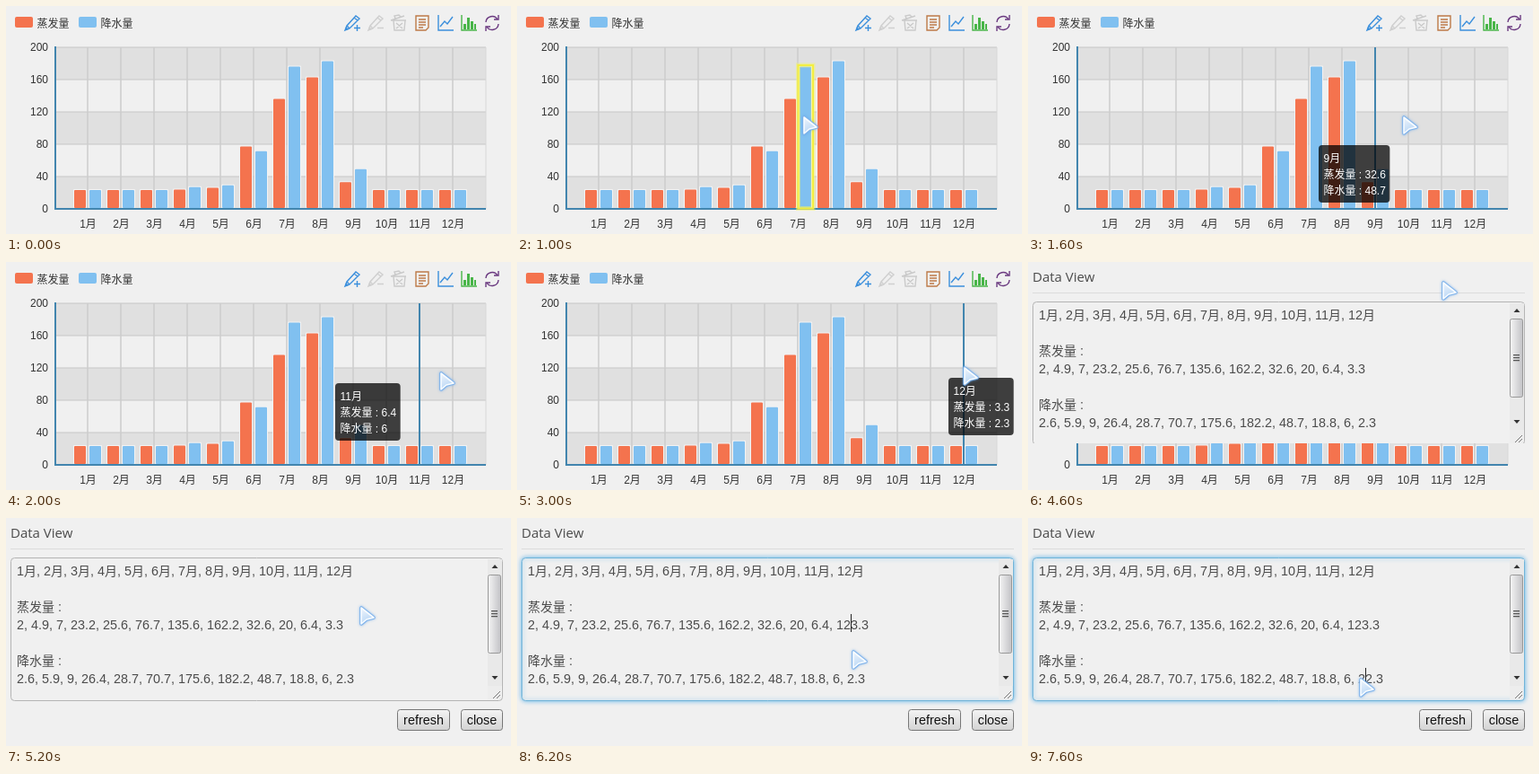
Write an HTML page with a canvas that moves like this. It is 563 by 254 pixels and loops after 8000 ms.

```html
<!DOCTYPE html>
<html lang="zh">
<head>
<meta charset="utf-8">
<title>Data View</title>
<style>
html, body { margin: 0; width: 100%; height: 100%; overflow: hidden; background: #f0f0f0; }
canvas { display: block; }
</style>
</head>
<body>
<canvas id="stage" width="563" height="254"></canvas>
<script>
const ctx = document.getElementById('stage').getContext('2d');
const STEP = 200, STEPS = 40;
const BG = '#f0f0f0', RED = '#f4734e', BLUE = '#80c0f0', AXIS = '#4285ae';
const SANS = '"Liberation Sans", "Noto Sans CJK SC", "Noto Sans CJK", sans-serif';
const NAMES = ['蒸发量', '降水量'];
const DATA = [
  [2, 4.9, 7, 23.2, 25.6, 76.7, 135.6, 162.2, 32.6, 20, 6.4, 3.3],
  [2.6, 5.9, 9, 26.4, 28.7, 70.7, 175.6, 182.2, 48.7, 18.8, 6, 2.3]
];
const MONTHS = DATA[0].map((_, i) => `${i + 1}月`);
const monthX = i => 91 + 37 * i;

// [step, x, y]
const POINTER = [[1, 338, 198], [4, 338, 198], [5, 319, 123], [10, 484, 123], [12, 497, 119],
  [15, 498, 117], [16, 496, 104], [20, 463, 23], [23, 462, 22], [27, 372, 124],
  [29, 372, 124], [31, 374, 148], [34, 370, 179], [39, 370, 179]];
const TIP = [[6, 281, 174], [10, 367, 135], [13, 481, 129], [18, 481, 129]];

function along(keys, s) {
  const i = keys.findIndex(k => k[0] >= s);
  if (i < 1) return keys[0].slice(1);
  const [a, x0, y0] = keys[i - 1], [b, x1, y1] = keys[i], f = (s - a) / (b - a);
  return [Math.round(x0 + (x1 - x0) * f), Math.round(y0 + (y1 - y0) * f)];
}

function rect(x, y, w, h, fill, radius = 0, stroke) {
  ctx.beginPath();
  ctx.roundRect(x, y, w, h, radius);
  if (fill) { ctx.fillStyle = fill; ctx.fill(); }
  if (stroke) { ctx.strokeStyle = stroke; ctx.lineWidth = 1; ctx.stroke(); }
}

function text(str, x, y, color = '#333', align = 'left', font = `12px ${SANS}`) {
  ctx.font = font;
  ctx.textAlign = align;
  ctx.fillStyle = color;
  ctx.fillText(str, x, y);
}

function gradient(x0, y0, x1, y1, from, to) {
  const g = ctx.createLinearGradient(x0, y0, x1, y1);
  g.addColorStop(0, from);
  g.addColorStop(1, to);
  return g;
}

function icon(x, color, d, solid) {
  ctx.save();
  ctx.translate(x, 19);
  ctx.strokeStyle = ctx.fillStyle = color;
  ctx.lineWidth = 1.4;
  ctx.stroke(new Path2D(d));
  if (solid) ctx.fill(new Path2D(solid));
  ctx.restore();
}

function toolbox() {
  const pencil = 'M-8 8L-6 3L4 -8L8 -5L-3 6ZM-6 3L-3 6M2 -6L6 -3';
  icon(386, '#3b8fdc', pencil + 'M2 5.5H9M5.5 2V9', 'M-8 8L-7 4L-4 7Z');
  icon(412, '#cfcfcf', pencil + 'M2 5.5H9', 'M-8 8L-7 4L-4 7Z');
  icon(438, '#cacaca', 'M-6 -3L-5 8H6L7 -3ZM-9 -3L6 -8M-4 -5L-5 -8L0 -9L2 -7M-3 0L4 6M4 0L-3 6M-8 -3H8');
  icon(464, '#bd7a48', 'M-7 -8H7V5L4 8H-7ZM-4 -4H4M-4 -1H4M-4 2H4M-4 5H1');
  icon(490, '#3b8fdc', 'M-8 -9V8H9M-6 4L-1 -2L2 1L8 -7');
  icon(515, '#48b548', 'M-7 -9V8H10', 'M-5 1h3v6h-3zM-1 -6h3v13h-3zM3 -2h3v9h-3zM7 1h2v6h-2z');
  icon(542, '#6b3a80', 'M-7 -1A7 7 0 0 1 6 -4M7 1A7 7 0 0 1 -6 4M7 -9V-4H2M-7 9V4H-2');
}

function legend() {
  [RED, BLUE].forEach((color, i) => {
    rect(10 + 71 * i, 12, 20, 12, color, 2);
    text(NAMES[i], 34.5 + 71 * i, 23.5);
  });
}

function chart(s) {
  legend();
  toolbox();
  for (let i = 0; i < 5; i++) {
    const y = 46 + 36 * i;
    if (i % 2 === 0) rect(55, y, 480, 36, '#e0e0e0');
    rect(55, y - .5, 480, 1, '#c8c8c8');
    text(200 - 40 * i, 47, y + 4, '#333', 'right');
  }
  text(0, 47, 230, '#333', 'right');
  MONTHS.forEach((m, i) => {
    rect(monthX(i) - .75, 46, 1.5, 180, '#cdcdcd');
    text(m, monthX(i) + .5, 246.5, '#333', 'center');
  });
  rect(534.5, 46, 1, 180, '#d8d8d8');
  rect(54, 45, 2, 182, AXIS);
  rect(54, 225, 481, 2, AXIS);
  DATA.forEach((row, k) => row.forEach((v, i) => {
    const x = monthX(i) - 15 + 17 * k, h = Math.max(v * .9, 20.5);
    rect(x - 1, 225 - h - .5, 15, h + .5, '#f3f3f3', 1);
    rect(x, 225.5 - h, 13, h - .5, k ? BLUE : RED, 1);
  }));
  if (s === 5) {
    ctx.strokeStyle = 'rgba(245,245,90,.45)';
    ctx.lineWidth = 5;
    ctx.strokeRect(313.5, 66, 16.5, 159.5);
    ctx.strokeStyle = '#f3ee42';
    ctx.lineWidth = 2;
    ctx.strokeRect(313.5, 66, 16.5, 159.5);
  }
  if (s >= 6 && s <= 18) tooltip(s);
}

function tooltip(s) {
  const m = Math.min(s, 11), [x, y] = along(TIP, s);
  const lines = [MONTHS[m], ...NAMES.map((n, k) => `${n} : ${DATA[k][m]}`)];
  rect(monthX(m) - 1, 46, 2, 180, AXIS);
  ctx.font = `12px ${SANS}`;
  const w = Math.max(...lines.map(l => ctx.measureText(l).width)) + 10;
  rect(x, y, w, 64, 'rgba(0,0,0,.74)', 4);
  lines.forEach((l, i) => text(l, x + 5.5, y + 18.5 + 18 * i, '#fff'));
}

// Latin runs are slightly larger than ideographs; returns the end position.
function mixed(str, x, y) {
  for (const run of str.match(/[\u4e00-\u9fff]+|[^\u4e00-\u9fff]+/g)) {
    const size = run > '\u4e00' ? 14 : 14.4;
    text(run, x, y, '#4c4c4c', 'left', `${size}px ${SANS}`);
    x += ctx.measureText(run).width;
  }
  return x;
}

function dataLine(row, typed, y) {
  const head = row.slice(0, -1).join(', ') + ', ' + typed;
  const caretX = mixed(head, 12, y);
  mixed(String(row[11]), caretX, y);
  return caretX;
}

function triangle(x, y, dir) {
  ctx.fillStyle = '#333';
  ctx.beginPath();
  ctx.moveTo(x - 3.5, y - 2 * dir);
  ctx.lineTo(x + 3.5, y - 2 * dir);
  ctx.lineTo(x, y + 2 * dir);
  ctx.fill();
}

function scrollbar() {
  rect(537, 46, 16, 141, '#e9e9e9');
  triangle(545, 54, -1);
  triangle(545, 178, 1);
  rect(537.5, 63.5, 14, 87, gradient(538, 0, 552, 0, '#f3f3f3', '#c0c0c4'), 2, '#999');
  for (let i = 0; i < 3; i++) rect(541, 103 + 3 * i, 7, 1.3, '#555');
  rect(537, 187, 15, 15, '#ededed');
  ctx.strokeStyle = '#777';
  ctx.lineWidth = 1;
  ctx.beginPath();
  for (const d of [4, 8]) {
    ctx.moveTo(551 - d, 201);
    ctx.lineTo(551, 201 - d);
  }
  ctx.stroke();
}

function button(label, x, w) {
  rect(x + .5, 213.5, w - 1, 23, gradient(0, 213, 0, 237, '#f5f5f5', '#d2d2d2'), 3, '#777');
  text(label, x + w / 2, 230, '#111', 'center', `14.4px ${SANS}`);
}

function dataView(s) {
  const height = [104, 202, 244][s - 22] || 254, focused = s >= 29;
  ctx.save();
  ctx.beginPath();
  ctx.rect(0, 0, 563, height);
  ctx.clip();
  rect(0, 0, 563, 254, BG);
  text('Data View', 5, 22, '#4c4c4c', 'left', '15px "Open Sans", "Noto Sans", sans-serif');
  rect(5, 34, 549, 1, '#dcdcdc');
  if (focused) {
    ctx.shadowColor = '#62b5e8';
    ctx.shadowBlur = 5;
  }
  rect(5.5, 44.5, 548, 159, BG, 4, focused ? '#6fb3d8' : '#b4b4b4');
  ctx.shadowBlur = 0;
  scrollbar();

  mixed(MONTHS.join(', '), 12, 64);
  const rows = ['12'.slice(0, Math.max(0, s - 29)), s >= 38 ? '2' : ''];
  const carets = rows.map((typed, k) => {
    mixed(NAMES[k] + ' :', 12, 104 + 60 * k);
    return dataLine(DATA[k], typed, 124 + 60 * k);
  });
  if (focused) {
    const k = s >= 36 ? 1 : 0;
    rect(Math.round(carets[k]), 107 + 60 * k, 1, 20, '#222');
  }
  button('refresh', 436, 59);
  button('close', 507, 47);
  ctx.restore();
}

function pointer(x, y) {
  const arrow = new Path2D('M1 1V19L7 14L15 12Z');
  ctx.save();
  ctx.translate(x, y);
  ctx.lineJoin = 'round';
  ctx.shadowColor = 'rgba(90,160,235,.7)';
  ctx.shadowBlur = 3;
  ctx.strokeStyle = '#7fb2ea';
  ctx.lineWidth = 3.6;
  ctx.stroke(arrow);
  ctx.shadowBlur = 0;
  ctx.fillStyle = gradient(0, 2, 8, 18, '#eef4fb', '#b9d7f6');
  ctx.fill(arrow);
  ctx.strokeStyle = '#f8fcff';
  ctx.lineWidth = 1.6;
  ctx.stroke(arrow);
  ctx.restore();
}

function frame() {
  const s = Math.floor(performance.now() / STEP) % STEPS;
  rect(0, 0, 563, 254, BG);
  if (s < 25) chart(s);
  if (s >= 22) dataView(s);
  if (s) pointer(...along(POINTER, s));
  requestAnimationFrame(frame);
}
frame();
</script>
</body>
</html>
```
